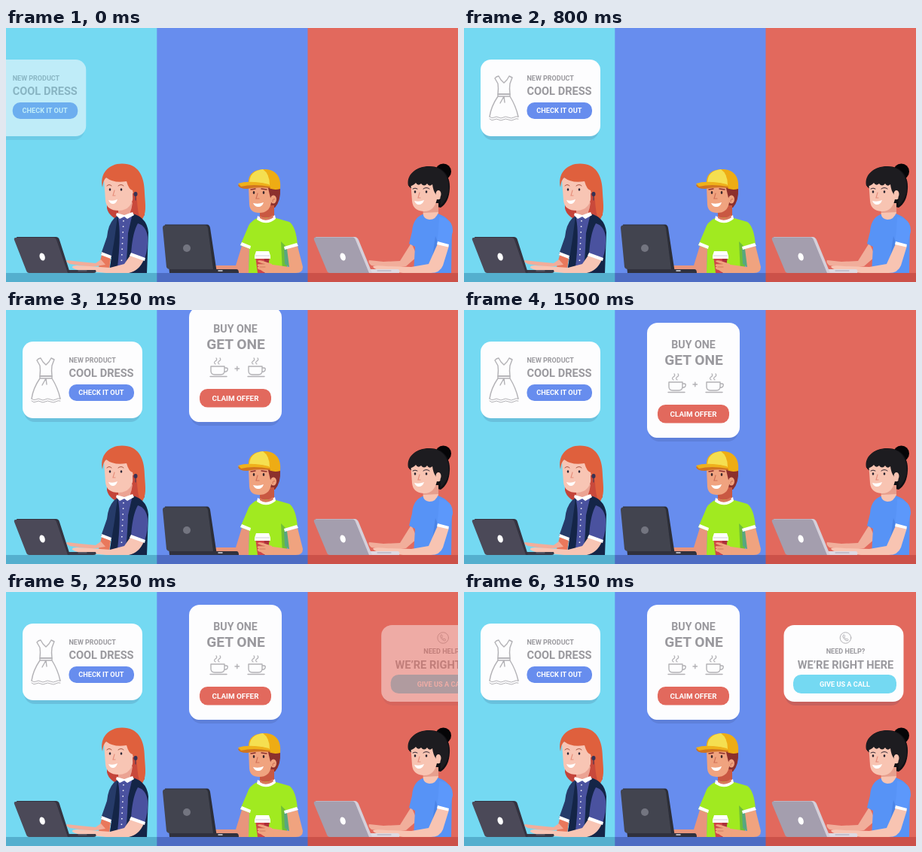
An HTML page that plays this animation: 600x338 px, repeating every 3.2 s.

```html
<!DOCTYPE html>
<html lang="en">
<head>
<meta charset="utf-8">
<title>Three offers</title>
<style>
  html, body { margin: 0; width: 100%; height: 100%; overflow: hidden; }
  svg { display: block; width: 100vw; height: 100vh; }
  text { font-family: Roboto, Arial, sans-serif; font-weight: 700; text-anchor: middle; fill: #9a999e; }
  .button { fill: #fff; }
  .sheet { fill: #fdfdfe; }
  .shade { fill: #24365f; opacity: .14; }
  .icon { fill: none; stroke: #b2b1b5; stroke-width: 1.4; stroke-linecap: round; stroke-linejoin: round; }
  .thin { stroke-width: 1; }
  .line { fill: none; stroke-linecap: round; }
</style>
</head>
<body>
<svg viewBox="0 0 600 338" preserveAspectRatio="none">
  <defs>
    <g id="mug" class="icon">
      <path d="M0 0H18V6Q18 11 13 11H5Q0 11 0 6ZM18 2H20Q23 2 22 5Q21 8 18 7M-1 13.500H21"/>
      <path d="M6-3Q3-5 6-7T7-11M11-3Q8-5 11-7T12-11" stroke-width="1.200"/>
    </g>
  </defs>

  <path fill="#74d9f2" d="M0 0H201V338H0Z"/>
  <path fill="#678dee" d="M200.300 0H401V338H200.300Z"/>
  <path fill="#e2695d" d="M400.500 0H600V338H400.500Z"/>
  <path fill="#54afce" d="M0 326H201V338H0Z"/>
  <path fill="#4d6cc3" d="M200.300 326H401V338H200.300Z"/>
  <path fill="#cc5149" d="M400.500 326H600V338H400.500Z"/>

  <!-- Red-haired woman -->
  <g>
    <path fill="#c4443a" d="M134 228H182L184 249Q174 262 152 256Q137 252 134 240Z"/>
    <path fill="#eba393" d="M149 232H168V250Q160 258 149 249Z"/>
    <path fill="#f8c5b4" d="M130 201Q142 194 169 205V222Q168 242 150 243Q133 243 132 229Z"/>
    <path fill="#df603d" d="M128 212C124 194 136 180.500 154 180.500C175 180.500 184 196 184 220C185 237 187 246 180 256Q171 250 171 231L168 216Q163 215 160 204Q143 207 133 199Q129 202 128 212Z"/>
    <path fill="#c9493b" d="M168 220Q173 218 174 231Q175 246 178 254Q169 253 165 245Q169 235 168 220Z"/>
    <ellipse cx="172" cy="221" rx="2.500" ry="3" fill="#353255"/>
    <path class="line" stroke="#353255" d="M172 224V229"/>
    <g fill="#2c2637"><ellipse cx="138" cy="215" rx="1.300" ry="1.800"/><ellipse cx="153" cy="215" rx="1.300" ry="1.800"/></g>
    <path class="line" stroke="#a74d3a" d="M134 210Q137 207 140 210M149 210Q153 207 156 210"/>
    <path class="line" stroke="#e58d7a" stroke-width="1.100" d="M144 216L142 223H145"/>
    <path fill="#fff" d="M136 229Q142 231 148 228Q146 234 142 234Q138 234 136 229Z"/>
    <path fill="#e9785c" d="M127 302L139 306L137 322H122Z"/>
    <path fill="#f2ad9a" d="M126 308L132 315L113 318L85 314Q78 311 81 309L98 311L119 313Z"/>
    <path fill="#263b69" d="M148 250Q136 257 134 278L126 301L140 306L137 326H187V267Q183 253 168 248Z"/>
    <path fill="#4a529f" d="M149 249H168L163 272L158 326H146L148 276Z"/>
    <path fill="#142547" d="M168 247Q187 252 189 272L187 326H160L162 273ZM148 250Q154 271 147 326H137L140 306Q145 277 148 250Z"/>
    <path d="M156 256L153 318" fill="none" stroke="#fff" stroke-width="1.500" stroke-dasharray="1.500 6"/>
    <path fill="#fff" d="M147 246L157 249L168 245L170 249L161 254L157 251L151 254L146 249Z"/>
    <path fill="#fff" d="M127 298L140 303L139 307L126 302Z"/>
    <path fill="#f8c5b4" d="M166 301L183 308Q177 323 163 326H133L105 323Q94 323 88 319Q87 316 94 316L111 317L138 319L157 314Z"/>
    <path fill="#4a529f" d="M175 260Q186 263 188 278Q189 293 184 307L166 300Q168 272 175 260Z"/>
    <path fill="#fff" d="M166 299L185 306L184 310L164 303Z"/>
    <path fill="#393a48" d="M83 322H119Q121 326 116 326H83Z"/>
    <path class="line" stroke="#777581" d="M96 323H107"/>
    <path fill="#343340" d="M14 278H66Q70 278 71 282L85 326H31Z"/>
    <path fill="#4b4958" d="M13 279H63Q66 279 67 282L82 326H31Q28 326 27 323L11 282Q10 279 13 279Z"/>
    <ellipse cx="48" cy="304.500" rx="3.500" ry="5.200" fill="#fff" transform="rotate(-18 48 304)"/>
  </g>

  <!-- Man in a cap -->
  <g>
    <path fill="#8c302d" d="M348 211L364 213Q365 230 357 239L349 239Z"/>
    <path fill="#c95842" d="M337 236H356V255Q347 262 337 254Z"/>
    <path fill="#f0a37f" d="M322 211H351L352 232Q350 246 336 246Q324 246 323 235Z"/>
    <path fill="#8c302d" d="M347 209H361L357 227L351 226Z"/>
    <ellipse cx="355" cy="228" rx="4" ry="5.500" fill="#f0a37f"/>
    <path class="line" stroke="#c96b51" d="M354 231Q354 226 357 228"/>
    <path fill="#eeac14" d="M322 207C321 194 330 188 343 188C358 188 366 198 364 214Q353 217 345 210Z"/>
    <path fill="#f5df50" d="M323 205Q324 190 341 188Q350 194 350 209Z"/>
    <path fill="#d07420" d="M308 209Q315 203 334 206Q350 207 351 213Q333 211 320 214Q309 214 308 209Z"/>
    <path fill="#efb11b" d="M308 207Q323 202 349 208L350 211Q328 207 312 211Z"/>
    <g fill="#37272b"><ellipse cx="329" cy="219" rx="1.300" ry="1.900"/><ellipse cx="342" cy="219" rx="1.300" ry="1.900"/></g>
    <path class="line" stroke="#8c302d" stroke-width="1.400" d="M325 215L331 214M339 214L346 215"/>
    <path class="line" stroke="#cf7258" stroke-width="1.200" d="M334 220L332 227H336"/>
    <path fill="#fff" d="M328 233Q335 235 342 232Q340 238 335 238Q330 238 328 233Z"/>
    <path fill="#e8957c" d="M313 290L323 293L322 326H307L306 323H282Q274 321 276 316L305 316Z"/>
    <path fill="#a1ea20" d="M334 253Q323 257 320 268L311 289L323 294L322 326H371L372 294L387 289Q385 264 376 258L355 252Z"/>
    <path fill="#6fbf35" d="M365 284L373 292V326H367Z"/>
    <path fill="#58a77f" d="M369 294L376 292V318L370 314Z"/>
    <path fill="#fff" d="M334 250Q344 257 357 249L358 254Q346 264 333 255Z"/>
    <path fill="#d9775b" d="M337 250Q345 256 354 249L355 252Q345 259 337 253Z"/>
    <path fill="#fff" d="M313 285L325 290L324 294L311 289Z"/>
    <path fill="#f0a37f" d="M373 294L387 290L394 318Q394 326 385 326H343Q335 324 337 316L354 315L376 318Z"/>
    <path fill="#fff" d="M369 291L386 286L388 290L370 295Z"/>
    <path fill="#cf4548" d="M331 303H350L347 326H334Z"/>
    <path fill="#ac303b" d="M343 303H350L347 326H342Z"/>
    <path fill="#fff" d="M332 297H349L351 303V307H330V303Z"/>
    <path class="line" stroke="#d1d0d8" d="M331 303H350"/>
    <path fill="#f0a37f" d="M353 314L341 310Q334 308 334 311L342 314H335Q332 316 336 318H334Q333 321 338 322L344 326H356Z"/>
    <path class="line" stroke="#ca7259" stroke-width=".8" d="M336 314H343M337 318H344"/>
    <path fill="#30313d" d="M275 321H306Q309 321 309 326H275Z"/>
    <path class="line" stroke="#dedde3" stroke-width="1.500" d="M282 323H287"/>
    <path fill="#2c2e38" d="M211 261.500H267Q270 261.500 271 266L280 326H217Z"/>
    <path fill="#42444f" d="M211 262.500H264Q267 262.500 268 266L275 321H218Q214 321 213 318L208 266Q208 262.500 211 262.500Z"/>
    <path fill="#30313d" d="M217 321H280V326H217Z"/>
    <circle cx="240" cy="293" r="5" fill="#737580"/>
  </g>

  <!-- Dark-haired woman -->
  <g>
    <circle cx="580.500" cy="191" r="10.500" fill="#050507"/>
    <path fill="#101014" d="M535 211C532 194 545 184 562 184C580 184 590 196 589 214Q588 232 577 239L563 236Z"/>
    <path fill="#e79f8d" d="M555 233H574V252Q565 258 553 250Z"/>
    <path fill="#f8c4b2" d="M537 203H569L575 217Q580 217 578 224Q577 229 572 228Q568 245 554 244Q540 243 539 230Z"/>
    <path fill="#1d1c20" d="M534 210C531 195 544 184.500 562 184.500C579 184.500 588 196 588 214Q586 229 577 236L576 217Q571 216 571 222Q567 217 566 208Q562 212 559 207Q555 212 551 207Q547 211 544 206Q540 211 534 210Z"/>
    <ellipse cx="574" cy="221" rx="3.500" ry="5" fill="#f8c4b2"/>
    <g fill="#27212c"><ellipse cx="543" cy="218" rx="1.300" ry="1.800"/><ellipse cx="558" cy="218" rx="1.300" ry="1.800"/></g>
    <path class="line" stroke="#332733" d="M540 214Q543 212 546 214M554 214Q558 211 562 214"/>
    <path class="line" stroke="#e48c7b" stroke-width="1.100" d="M549 219L547 226H550"/>
    <path fill="#fff" d="M542 230Q548 232 555 229Q553 235 548 235Q544 235 542 230Z"/>
    <path fill="#f1ae9b" d="M538 286L546 304L531 317L507 320L485 316Q480 312 482 309L501 311L523 310Z"/>
    <path fill="#5793f6" d="M553 248Q540 253 539 271L535 287L543 291L541 326H591L592 266Q589 252 573 247Z"/>
    <path fill="#f8c4b2" d="M554 246L574 245Q571 255 562 255Q555 254 554 249Z"/>
    <path fill="#4b84e6" d="M570 277L576 292L572 314L564 318Z"/>
    <path fill="#f8c4b2" d="M573 287L588 290L580 316Q576 326 564 326H527L501 323Q490 322 487 318Q488 315 505 317L538 318L561 314Z"/>
    <path fill="#5c98fb" d="M575 251Q594 254 593 271L588 290L572 286L574 269Z"/>
    <path fill="#fff" d="M573 284L588 288L587 291.500L572 288Z"/>
    <path fill="#dedae2" d="M483 321H520Q523 321 522 326H483Z"/>
    <path class="line" stroke="#aaa4b3" d="M493 323H511"/>
    <path fill="#d5d0da" d="M411 278H463Q466 278 468 282L486 326H430Z"/>
    <path fill="#a49eae" d="M411 278.500H460Q463 278.500 464 282L482 326H430Q427 326 426 323L409 282Q408 278.500 411 278.500Z"/>
    <ellipse cx="447" cy="304.500" rx="3.500" ry="5.200" fill="#fff" transform="rotate(-18 447 304)"/>
  </g>

  <g id="dress">
    <rect class="shade" x="24" y="50" width="155" height="99" rx="14"/>
    <rect class="sheet" x="22" y="42" width="159" height="102" rx="14"/>
    <g class="icon">
      <path d="M43 65L46 64L49 69L53 73L57 69L60 64L64 66L61 74Q60 80 61 88H45Q46 80 45 74L41 67Z"/>
      <path d="M45 88H61V91H45ZM45 91Q36 104 34 118M61 91Q69 104 72 118M53 91L48 100M53 91L54 99"/>
      <path class="thin" d="M34 118Q37 121 40 119T46 119T52 119T59 119T66 119T72 118M34 121Q37 124 40 122T46 122T52 122T59 122T66 122T72 121"/>
    </g>
    <text x="114.700" y="70" font-size="9">NEW PRODUCT</text>
    <text x="126.500" y="89" font-size="14.600">COOL DRESS</text>
    <rect x="83.500" y="99" width="86.500" height="22" rx="10" fill="#678dee"/>
    <text class="button" x="126.300" y="113" font-size="9.200">CHECK IT OUT</text>
  </g>

  <g id="coffee">
    <rect class="shade" x="245" y="26" width="119" height="149" rx="14"/>
    <rect class="sheet" x="243" y="17" width="123" height="153" rx="14"/>
    <text x="304.500" y="51" font-size="14.200">BUY ONE</text>
    <text x="305" y="72.500" font-size="19.200">GET ONE</text>
    <use href="#mug" x="272" y="96"/>
    <use href="#mug" x="322" y="96"/>
    <path class="icon" d="M304 99H309.500M306.800 96.300V101.700"/>
    <rect x="257" y="126" width="95" height="24.500" rx="10.500" fill="#e2695d"/>
    <text class="button" x="304.500" y="141.500" font-size="9.850">CLAIM OFFER</text>
  </g>

  <g id="help">
    <rect class="shade" x="426" y="52" width="155" height="99" rx="14"/>
    <rect class="sheet" x="424.500" y="44" width="159" height="102" rx="14"/>
    <g class="icon">
      <circle class="thin" cx="506.500" cy="61" r="7.300"/>
      <path class="thin" d="M504 57L502.800 58.300Q503.500 63.500 508.800 65L510.300 63.700L508.300 62L507.200 62.800Q505.400 61.700 504.700 59.800L505.500 59Z"/>
    </g>
    <text x="506.500" y="82" font-size="9.100">NEED HELP?</text>
    <text x="506.500" y="101.500" font-size="14.600">WE’RE RIGHT HERE</text>
    <rect x="437" y="110" width="137" height="25" rx="10.500" fill="#74d9f2"/>
    <text class="button" x="505.500" y="126" font-size="9.200">GIVE US A CALL</text>
  </g>
</svg>
<script>
const LOOP = 3200;
const cards = [
  { id: 'dress', start: 0, length: 590, dx: -75, dy: 0, power: 2, alpha: .55, fade: 390 },
  { id: 'coffee', start: 1000, length: 500, dx: 0, dy: -170, power: 3, alpha: 0, fade: 180 },
  { id: 'help', start: 2150, length: 500, dx: 145, dy: 0, power: 3, alpha: 0, fade: 225 }
].map(card => ({ ...card, node: document.getElementById(card.id) }));

const clamp = value => Math.max(0, Math.min(1, value));

function draw(time) {
  for (const card of cards) {
    const elapsed = time - card.start;
    const remaining = (1 - clamp(elapsed / card.length)) ** card.power;
    const alpha = elapsed < 0 ? 0 : card.alpha + (1 - card.alpha) * clamp(elapsed / card.fade);
    card.node.setAttribute('transform', `translate(${card.dx * remaining} ${card.dy * remaining})`);
    card.node.setAttribute('opacity', alpha);
  }
}

const origin = performance.now();
function tick() {
  draw((performance.now() - origin) % LOOP);
  requestAnimationFrame(tick);
}
draw(0);
requestAnimationFrame(tick);
</script>
</body>
</html>
```
